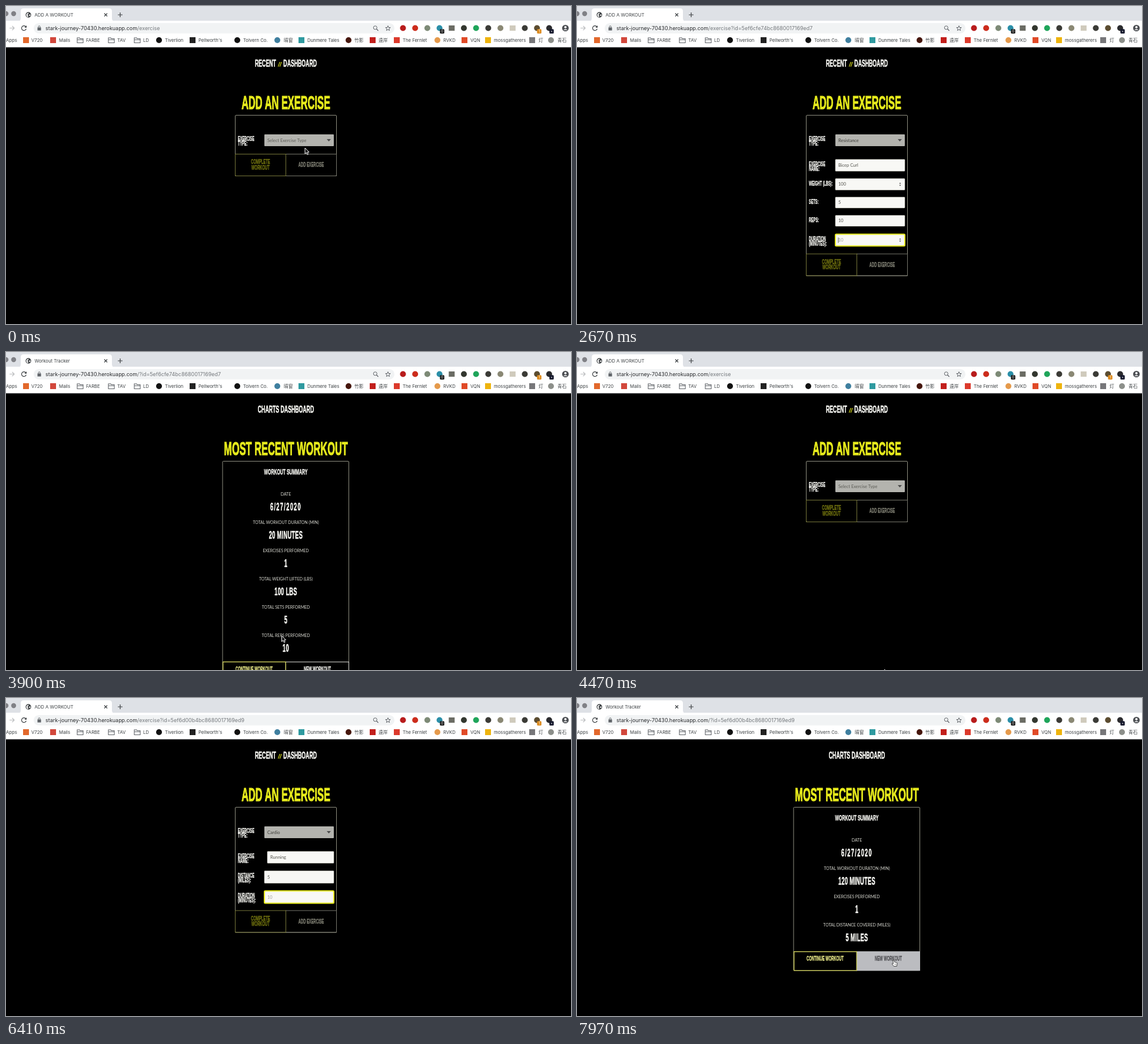
Write an HTML page that moves like this. It is 960x540 px and loops after 8000 ms.

```html
<!DOCTYPE html>
<html lang="en">
<head>
<meta charset="utf-8">
<title>Workout tracker</title>
<style>
  html, body { margin: 0; width: 100%; height: 100%; overflow: hidden; background: #000; }
  svg { display: block; width: 100%; height: 100%; }
  text { white-space: pre; }
  .ui { font-family: Inter, "Noto Sans CJK SC", "Noto Sans CJK", sans-serif; }
  .body { font-family: Lato, sans-serif; }
  .display { font-family: "Liberation Sans", Arial, sans-serif; font-weight: 700; }
</style>
</head>
<body>
<svg id="stage" viewBox="0 0 960 540">
  <rect width="960" height="540"/>
  <g id="page"></g>
  <g id="chrome"></g>
  <g id="status"></g>
  <g id="pointer"></g>
</svg>
<script>
const LOOP = 8000;
const CONDENSE = 0.513;          // one ratio for the whole display face
const YELLOW = "#e6ea1c", PALE = "#cbcb5c", WHITE = "#fbfbf6", EDGE = "#8f8f80";
const INK = "#3c4043", GRAY = "#5f6368";
const HOST = "stark-journey-70430.herokuapp.com";

const rect = (x, y, w, h, fill, extra = "") =>
  `<rect x="${x}" y="${y}" width="${w}" height="${h}" fill="${fill}" ${extra}/>`;
const dot = (x, y, r, fill, extra = "") =>
  `<circle cx="${x}" cy="${y}" r="${r}" fill="${fill}" ${extra}/>`;
const line = (d, stroke = INK, w = 1.2) =>
  `<path d="${d}" fill="none" stroke="${stroke}" stroke-width="${w}"/>`;
const text = (cls, x, y, size, str, fill, anchor = "start") =>
  `<text class="${cls}" x="${x}" y="${y}" font-size="${size}" fill="${fill}" text-anchor="${anchor}">${str}</text>`;
const display = (x, y, size, str, fill, anchor = "middle", track = 0) =>
  `<text class="display" transform="translate(${x} ${y}) scale(${CONDENSE} 1)" font-size="${size}" fill="${fill}"
    stroke="${fill}" stroke-width="${size * 0.035}" text-anchor="${anchor}" letter-spacing="${track}">${str}</text>`;
const frame = (x, y, w, h, stroke, fill = "none", r = 0) =>
  rect(x, y, w, h, fill, `rx="${r}" stroke="${stroke}"`);
const within = (t, ...spans) => spans.some(([a, b]) => t >= a && t < b);

// ---- browser window ----

const bookmarks = [
  [34, "sq", "#e2682c", 43, "V720"], [80, "sq", "#d2483c", 90, "Mails"],
  [126, "folder", "", 136, "FARBE"], [179, "folder", "", 189, "TAV"], [223, "folder", "", 233, "LD"],
  [260, "ci", "#111", 270, "Tiverlion"], [317, "sq", "#222", 327, "Pellworth's"],
  [393, "ci", "#111", 403, "Tolvern Co."], [461, "ci", "#3f7f9f", 472, "晴窗"],
  [502, "sq", "#2f9aa0", 512, "Dunmere Tales"], [582, "ci", "#46160c", 592, "竹影"],
  [623, "sq", "#c21f1c", 633, "遠岸"], [664, "sq", "#dc3a2c", 674, "The Fernlet"],
  [733, "ci", "#e59a4c", 743, "RVKD"], [779, "sq", "#e04a28", 789, "VQN"],
  [819, "sq", "#eeb40e", 829, "mossgatherers"], [894, "sq", "#77777a", 905, "灯"],
  [926, "ci", "#8c8f8a", 937, "青石"]
];
const extensions = ["#b81c1c", "#cc2c1c", "#7d8a76", "#2b8fa8", "#6b6c64", "#33372f", "#1fa55a",
  "#3b3b36", "#8a8874", "#cfcabc", "#3b3b36", "#5b4c30", "#2b2b2e"];

function icon(x, kind, color) {
  if (kind === "ci") return dot(x, 58, 5, color);
  if (kind === "sq") return rect(x - 5, 53, 10, 10, color);
  return line(`M${x - 5} 54h4l1 1.5h5v7h-10zM${x - 5} 57.3h10`, GRAY, 1.1);
}

function chrome() {
  let s = rect(0, 0, 960, 26, "#dee1e6") + rect(0, 25, 960, 45, "#fff") + rect(0, 69.3, 960, 1, "#d0d2d6");
  s += '<path d="M20 26q5 0 5-5v-12q0-5 5-5h145q5 0 5 5v12q0 5 5 5z" fill="#fff"/>';
  s += dot(0, 13, 4.2, "#808186") + dot(13, 13, 4.2, "#808186");
  s += line("M167 12.500l5 5m0-5l-5 5") + line("M190 15h8m-4-4v8");
  s += line("M6 37.500h8m-3.500-3.500l3.500 3.500l-3.500 3.500", "#babcbe");
  s += rect(47, 29, 613, 17.500, "#f1f3f4", 'rx="8.700"');
  s += rect(53.500, 36.500, 6, 5, GRAY) + line("M55 37v-1.500q0-1.800 1.500-1.800t1.500 1.800v1.500", GRAY, 1);
  s += dot(627.300, 36.800, 3, "none", `stroke="${GRAY}"`) + line("M629.500 39l3 3", GRAY);
  const star = [...Array(10)].map((_, i) => {
    const r = i % 2 ? 1.9 : 4.4, a = (i / 5 - 0.5) * Math.PI;
    return (649 + r * Math.cos(a)).toFixed(1) + " " + (38 + r * Math.sin(a)).toFixed(1);
  });
  s += line(`M${star.join("L")}z`, GRAY, 1);
  extensions.forEach((c, i) => {
    const x = 674.5 + i * 20.7;
    s += i % 5 === 4 ? rect(x - 5, 33, 10, 9, c) : dot(x, 37.5, 5, c);
  });
  s += dot(950.5, 37.500, 5.600, "#4b4e52") + dot(950.5, 36, 2, "#fff") + '<path d="M947 41q3.500-3.500 7 0z" fill="#fff"/>';
  s += text("ui", 0, 61, 7.7, "Apps", INK);
  for (const [x, kind, color, tx, name] of bookmarks)
    s += icon(x, kind, color) + text("ui", tx, 61, 7.7, name, INK);
  return s;
}

function status(t) {
  const { title, path, loading } = address(t);
  let s = text("ui", 48.5, 17.8, 7.7, title, INK);
  s += text("ui", 67, 41, 8.95, `${HOST}<tspan fill="#75797d">${path}</tspan>`, "#26282b");
  if (loading) {
    s += `<g transform="rotate(${(t * 0.4 % 360).toFixed(0)} 38 15)">${line("M38 10.500a4.500 4.500 0 1 1-4.500 4.500", "#4d63a8", 1.3)}</g>`;
    s += line("M27 34l7 7m0-7l-7 7");
  } else {
    s += dot(38, 15, 4.700, INK) + '<path d="M34.500 14q2-3 4-2.500q0 2-2 3.500l1.500 2l-1 2q-3-1-2.500-5zM40 14l2 1l-1.500 2.500l-1.500-1.500z" fill="#eee"/>';
    s += line("M33.800 35.300a4 4 0 1 0 .5 3.500") + `<path d="M35 33v3.700h-3.700z" fill="${INK}"/>`;
    s += badge(741, 43, "#171717", "0");
  }
  if (!within(t, [1400, 3100], [7600, LOOP])) s += badge(906, 43, "#dd8a1c", "1");
  return s + badge(927, 43, "#15182c", "•");
}
const badge = (x, y, fill, str) =>
  rect(x - 3.7, y - 3.7, 7.4, 7.4, fill, 'rx="1.500"') + text("ui", x, y + 2, 5.5, str, "#fff", "middle");

// ---- what happens when ----

const workouts = [
  { id: "5ef6cfe74bc8680017169ed7", start: 0, idAt: 100, open: 280, pick: 620, submit: 3230, home: 3420, data: 3600,
    kind: "Resistance", row: 1, bottom: 458,
    fields: [
      { label: ["EXERCISE", "NAME:"], y: 260.5, h: 20, ph: "Bicep Curl", val: "Bicep Curl", focus: 900, type: 1000, rate: 60 },
      { label: ["WEIGHT (LBS):"], y: 293, h: 19.5, ph: "200", val: "100", focus: 1680, type: 1760, rate: 70, spin: true },
      { label: ["SETS:"], y: 324.5, h: 18.5, ph: "4", val: "5", focus: 1980, type: 2060, rate: 70 },
      { label: ["REPS:"], y: 355.5, h: 18.5, ph: "10", val: "10", focus: 2180, type: 2260, rate: 90 },
      { label: ["DURATION", "(MINUTES):"], y: 387.5, h: 20, ph: "10", val: "20", focus: 2450, type: 2740, rate: 90, spin: true }],
    stats: [["DATE", "6/27/2020"], ["TOTAL WORKOUT DURATON (MIN)", "20 MINUTES"], ["EXERCISES PERFORMED", "1"],
      ["TOTAL WEIGHT LIFTED (LBS)", "100 LBS"], ["TOTAL SETS PERFORMED", "5"], ["TOTAL REPS PERFORMED", "10"]] },
  { id: "5ef6d00b4bc8680017169ed9", start: 4400, idAt: 4600, open: 4850, pick: 5180, submit: 7030, home: 7200, data: 7330,
    kind: "Cardio", row: 2, bottom: 398,
    fields: [
      { label: ["EXERCISE", "NAME:"], x: 444, y: 260.5, h: 20, ph: "Running", val: "Running", focus: 5400, type: 5860, rate: 45 },
      { label: ["DISTANCE", "(MILES):"], y: 293.5, h: 21, ph: "5", val: "5", focus: 6220, type: 6290, rate: 70 },
      { label: ["DURATION", "(MINUTES):"], y: 327.5, h: 21, ph: "10", val: "120", focus: 6390, type: 6450, rate: 60 }],
    stats: [["DATE", "6/27/2020"], ["TOTAL WORKOUT DURATON (MIN)", "120 MINUTES"], ["EXERCISES PERFORMED", "1"],
      ["TOTAL DISTANCE COVERED (MILES)", "5 MILES"]] }
];
const current = t => workouts[t < workouts[1].start ? 0 : 1];

function address(t) {
  const w = current(t), query = "?id=" + w.id;
  if (t < w.submit) return { title: "ADD A WORKOUT", path: "/exercise" + (t >= w.idAt ? query : "") };
  return { title: "Workout Tracker", path: t >= w.data ? "/" + query : "", loading: t < w.home };
}

// ---- pages ----

const typed = (f, t) => f.val.slice(0, Math.max(0, Math.floor((t - f.type) / f.rate) + 1));

function formLabel(y, lines) {
  return lines.map((l, i) => display(394, y + i * 8.3, 10.8, l, WHITE, "start")).join("");
}

function fieldBox(f, t, w, focused) {
  const x = f.x || 439, base = f.y + f.h / 2 + 2.7, value = t < w.submit ? typed(f, t) : "";
  const caret = focused && Math.floor(t / 500) % 2 === 1;
  let s = rect(x, f.y, 557 - x, f.h, "#f8f8f5", focused
    ? `rx="1.500" stroke="${YELLOW}" stroke-width="2"` : `rx="1" stroke="#c8c8b8" stroke-width=".500"`);
  s += value
    ? text("body", x + 5, base, 7.5, value + (caret ? "<tspan>|</tspan>" : ""), "#55554f")
    : text("body", x + 5, base, 7.5, f.ph, "#a3a39c") + (caret ? line(`M${x + 5} ${base - 7}v9`, INK, 0.8) : "");
  if (f.spin && t >= f.focus) {
    const y = f.y + f.h / 2;
    s += `<path d="M547.500 ${y - 1}l1.500-2l1.500 2zM547.500 ${y + 1}l1.500 2l1.500-2z" fill="#444"/>`;
  }
  return s + formLabel(f.label[1] ? f.y + 11 : base, f.label);
}

function popup(t, w) {
  const hot = Math.min(w.row, Math.floor((t - w.open) / 100));
  let s = rect(437, 216, 124, 47, "#ececec", 'rx="3" stroke="#8f8f8f" stroke-width=".600"');
  ["Select Exercise Type", "Resistance", "Cardio"].forEach((name, i) => {
    if (i === hot) s += rect(437, 218 + i * 14.5, 124, 14, "#4a82d8");
    s += text("body", 444, 228 + i * 14.5, 7.5, name, i === hot ? "#fff" : INK);
  });
  return s;
}

function exercisePage(t) {
  const w = current(t), chosen = t >= w.pick, bottom = chosen ? w.bottom : 288.5, top = bottom - 37;
  const ready = t >= w.submit || chosen && w.fields.every(f => typed(f, t) === f.val);
  const focused = w.fields.filter(f => t >= f.focus).pop();
  const hover = ready && t >= w.submit - 180;
  let s = display(423, 102.5, 17, "RECENT", WHITE, "start") + display(528, 102.5, 17, "DASHBOARD", WHITE, "end");
  s += `<text class="display" x="465" y="103" font-size="10" font-style="italic" fill="${YELLOW}" text-anchor="middle">//</text>`;
  s += display(475.5, 175, 32, "ADD AN EXERCISE", YELLOW);
  s += frame(389.5, 185.5, 172, bottom - 185.5, EDGE, "none", 1.5);
  s += formLabel(229, ["EXERCISE", "TYPE:"]);
  s += rect(439, 218, 118, 20, "#b3b3ae", 'rx="1"');
  s += text("body", 444, 231, 7.5, chosen ? w.kind : "Select Exercise Type", chosen ? "#3c3c38" : "#5c5c56");
  s += '<path d="M545 226h7l-3.500 4z" fill="#4a4a4a"/>';
  if (chosen) for (const f of w.fields) s += fieldBox(f, t, w, f === focused && t < w.submit);
  s += frame(475.5, top, 86, 37, ready ? "#dcdcc8" : "#77776c");
  s += frame(389.5, top, 86, 37, ready ? PALE : "#76763a", hover ? "#dcf000" : "none");
  const go = hover ? "#3c4300" : ready ? YELLOW : "#70720f";
  s += display(432.5, top + 16.5, 11.4, "COMPLETE", go) + display(432.5, top + 26.3, 11.4, "WORKOUT", go);
  s += display(518.5, top + 21.5, 11.3, "ADD EXERCISE", ready ? WHITE : "#7c7c70");
  if (within(t, [w.open, w.pick])) s += popup(t, w);
  return s;
}

function homePage(t) {
  const w = current(t), stats = t >= w.data ? w.stats : [], top = 239.5 + stats.length * 47.8;
  const hover = within(t, [4150, 4400], [7760, LOOP]);
  let s = display(475.5, 102.5, 17, "CHARTS DASHBOARD", WHITE) + display(475.5, 175, 32, "MOST RECENT WORKOUT", YELLOW);
  s += frame(368, 185.5, 214.5, top - 153.5, EDGE, "none", 1.5) + display(475.5, 208, 13.5, "WORKOUT SUMMARY", WHITE);
  stats.forEach(([name, value], i) => {
    const y = 244 + i * 48;
    s += text("body", 475.5, y, 6.9, name, "#dcdcd4", "middle");
    s += display(475.5, y + 24.5, 18, value, WHITE, "middle", value.includes("/") ? 2.6 : 0.6);
  });
  s += frame(475.5, top, 107, 32, hover ? "#bbbcc0" : "#e2e2dc", hover ? "#bbbcc0" : "none");
  s += `<rect x="368.700" y="${top}" width="106.500" height="32" fill="none" stroke="${PALE}" stroke-width="1.400"/>`;
  s += display(421.5, top + 15.7, 11.4, "CONTINUE WORKOUT", stats.length ? "#eeee8c" : "#d2d25c");
  s += display(529, top + 15.7, 11.4, "NEW WORKOUT", hover ? "#505054" : WHITE);
  return s;
}

// ---- pointer: time, x, y ----

const track = [
  [0, 510.5, 246.5], [60, 510.5, 246.5], [240, 505, 231], [340, 505, 231], [560, 480, 242], [620, 480, 242],
  [880, 478, 272], [2950, 478, 330], [3170, 433, 447], [3680, 433, 447], [4180, 525, 544.5], [4500, 525, 544.5],
  [4800, 505, 231], [4900, 505, 231], [5100, 480, 258], [5180, 480, 258], [5380, 475, 278], [6600, 475, 300],
  [6840, 448.5, 379], [7440, 448.5, 379], [7840, 539, 450], [LOOP, 539, 450]
];
function place(t) {
  const i = track.findIndex(k => k[0] > t), a = track[i - 1], b = track[i];
  const u = (t - a[0]) / (b[0] - a[0]), e = u * u * (3 - 2 * u);
  return [a[1] + (b[1] - a[1]) * e, a[2] + (b[2] - a[2]) * e];
}
const shapes = {
  arrow: '<path d="M-2.500-5.500v10l2.300-2.100l1.700 3.600l1.700-.800l-1.700-3.500h3z" fill="#111" stroke="#fff" stroke-width="1"/>',
  hand: '<path d="M-2-5q1.200-.800 1.700.500l1 3l3.300.500q1.200.400 1 2l-.700 4.500h-5l-3.200-4q.600-1.500 2.200 0z" fill="#fff" stroke="#222" stroke-width=".800"/>' + line("M1 1v2.500m1.700-2.500v2.500", "#555", 0.6),
  beam: line("M-2-5.500q2 0 2 1.500v8q0 1.500-2 1.500m4-11q-2 0-2 1.500m0 8q0 1.500 2 1.500", "#4a4a46", 1)
};
function pointer(t) {
  if (within(t, [1000, 2900], [5850, 6580])) return "";
  const [x, y] = place(t);
  const kind = within(t, [3120, 3700], [4120, 4400], [6780, 7480], [7760, LOOP]) ? "hand"
    : within(t, [840, 1000], [5320, 5850], [6580, 6640]) ? "beam" : "arrow";
  return `<g transform="translate(${x.toFixed(2)} ${y.toFixed(2)})">${shapes[kind]}</g>`;
}

// ---- playback ----

const shown = {};
function put(id, markup) {
  if (shown[id] === markup) return;
  shown[id] = markup;
  document.getElementById(id).innerHTML = markup;
}
function draw(t) {
  put("page", t >= current(t).home ? homePage(t) : exercisePage(t));
  put("status", status(t));
  put("pointer", pointer(t));
}
put("chrome", chrome());
draw(0);
const begin = performance.now();
(function tick() {
  draw((performance.now() - begin) % LOOP);
  requestAnimationFrame(tick);
})();
</script>
</body>
</html>
```
